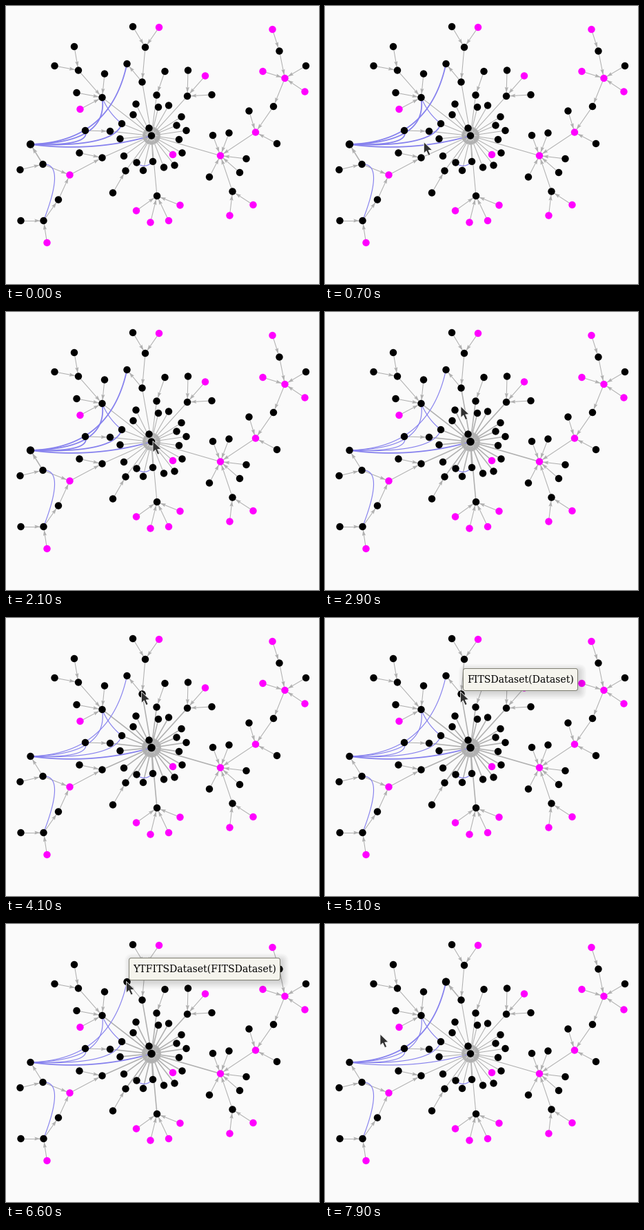
These frames come from a looping animation (454x404 px, 8 s). A matplotlib script:

```python
import numpy as np
import matplotlib.pyplot as plt
from matplotlib.animation import FuncAnimation
from matplotlib.collections import LineCollection, PolyCollection
from matplotlib.patches import Circle, FancyBboxPatch, Polygon

W, H, DPI = 454, 404, 64
PX = 72 / DPI
FRAMES, STEP = 80, 100
GREY, BLUE, MAGENTA = "#b0b0b0", "#8580ee", "#ff00ff"
RADIUS, HEAD = 5.2, 8.0

# Hubs of the class tree
CORE, LEFT, FITS, YTFITS = (211, 188.5), (35.5, 201), (197.5, 110.5), (175.5, 84)
TOP, WEST, NORTHWEST, EAST = (202, 60), (139.5, 133), (105, 93.5), (311, 217.5)
NORTHEAST, SOUTH, SOUTHEAST = (263, 131), (219, 276), (328.5, 269.5)
FAR, BEND, CORNER, CROWN = (362, 183.5), (388, 146), (404.5, 105), (396.5, 65.5)
SLOPE, FORK, MEET, STAIR, BASE = (139.5, 220.5), (53.5, 230), (92.5, 245.5), (76, 281.5), (54.5, 312)
TWIG, ARM, FOOT = (218.5, 129.5), (151, 182), (173.5, 239.5)
ELBOW, PAIR = (168, 171), ((189.5, 227.5), (213, 226))

edges = []   # (source, target)


def join(target, *sources):
    edges.extend((source, target) for source in sources)


join(CORE, FITS, WEST, NORTHEAST, TWIG, ARM, FOOT, SLOPE, SOUTH, EAST, ELBOW, *PAIR)
join(CORE, (236, 144.5), (221, 147), (188.5, 142.5), (184.5, 158), (254.5, 161),
     (247.5, 173.5), (261.5, 181), (251, 194), (255.5, 213.5), (242, 216),
     (244.5, 231.5), (229, 234.5), (199, 239), (171, 218), (165.5, 193), (207.5, 177.5))
join(FITS, TOP)
join(YTFITS, FITS)
join(TOP, (184, 30), (222, 31))
join(WEST, NORTHWEST, (143, 98.5), (102.5, 126), (107.5, 150))
join(NORTHWEST, (99, 59), (70.5, 87))
join(NORTHEAST, (264, 93.5), (289, 101.5), (298.5, 129))
join(TWIG, (230.5, 95))
join(ARM, (115, 181))
join(FOOT, (155, 271.5))
join(SLOPE, (106.5, 213.5), MEET)
join(MEET, FORK, STAIR)
join(LEFT, FORK)
join(FORK, (20.5, 238))
join(STAIR, BASE)
join(BASE, (21.5, 312), (59.5, 344))
join(SOUTH, (189, 297.5), (209.5, 314.5), (236, 312), (252.5, 289.5))
join(EAST, FAR, SOUTHEAST, (300, 188), (323.5, 184.5), (348.5, 222), (339, 242), (295, 248.5))
join(SOUTHEAST, (358.5, 289), (324.5, 304.5))
join(FAR, BEND, (352.5, 152.5), (393, 200))
join(BEND, CORNER)
join(CORNER, CROWN, (372.5, 95), (435, 87), (433.5, 124.5))
join(CROWN, (386.5, 34))

# Curved links: start, control, end
curves = [
    (LEFT, (151, 198), YTFITS),
    (LEFT, (149, 199), WEST),
    (LEFT, (124, 204), (115, 181)),
    (LEFT, (157, 206), ELBOW),
    (LEFT, (126, 213), CORE),
    (WEST, (149, 156), ELBOW),
    (FORK, (87, 228), BASE),
    (PAIR[0], (201, 238), PAIR[1]),
]

nodes = list(dict.fromkeys(p for edge in edges for p in edge))
pink = {MEET, EAST, FAR, CORNER, (222, 31), (107.5, 150), (289, 101.5), (242, 216),
        (59.5, 344), (189, 297.5), (209.5, 314.5), (236, 312), (252.5, 289.5),
        (358.5, 289), (324.5, 304.5), (372.5, 95), (433.5, 124.5), (386.5, 34)}


def bezier(start, control, end):
    t = np.linspace(0, 1, 40)[:, None]
    a, b, c = map(np.array, (start, control, end))
    return (1 - t) ** 2 * a + 2 * t * (1 - t) * b + t ** 2 * c


def arrow(source, target, scale):
    source, target = np.array(source), np.array(target)
    along = (target - source) / np.hypot(*(target - source))
    side = np.array([-along[1], along[0]])
    length = min(HEAD * scale, np.hypot(*(target - source)) - RADIUS)
    tip = target - along * RADIUS
    back = tip - along * length
    notch = tip - along * length * 0.85
    width = 2.6 * scale
    return [tip, back + side * width, notch, back - side * width]


fig = plt.figure(figsize=(W / DPI, H / DPI), dpi=DPI, facecolor="#fafafa")
ax = fig.add_axes([0, 0, 1, 1])
ax.set(xlim=(0, W), ylim=(H, 0))
ax.axis("off")

lines = LineCollection(edges, colors=GREY, zorder=1)
arcs = LineCollection([bezier(*c) for c in curves], colors=BLUE, zorder=2)
heads = PolyCollection([arrow(*e, 1) for e in edges], facecolors=GREY, edgecolors="none", zorder=3)
for collection in (lines, arcs, heads):
    ax.add_collection(collection, autolim=False)

dots = {}
for point in nodes:
    color = MAGENTA if point in pink else "black"
    dots[point] = ax.add_patch(Circle(point, RADIUS, fc=color, ec="none", zorder=4))


def rounded(x, y, w, h, r, **style):
    return ax.add_patch(FancyBboxPatch((x, y), w, h, boxstyle=f"round,pad=0,rounding_size={r}", **style))


def tooltip(x, y, w, h, label):
    parts = []
    for grow in np.linspace(9, -7, 12):
        parts.append(rounded(x + 3 - grow, y + 3 - grow, w + 2 * grow, h + 2 * grow,
                             max(grow + 3, 2), fc=(0, 0, 0, 0.018), ec="none", zorder=5))
    parts.append(rounded(x + 0.5, y + 0.5, w - 1, h - 1, 3, fc="#f5f4ed",
                         ec="#808074", lw=PX, zorder=6))
    parts.append(ax.text(x + 6, y + 21, label, family="DejaVu Serif", size=14 * PX,
                         color="black", va="baseline", zorder=7))
    return parts


tips = [
    (4300, 5300, tooltip(200, 73, 167, 33, "FITSDataset(Dataset)")),
    (6200, 7500, tooltip(178, 49, 220, 33, "YTFITSDataset(FITSDataset)")),
]

POINTER = np.array([(0, 0), (0, 16.5), (3.8, 13), (6.8, 19.6), (9.6, 18.4),
                    (6.7, 12), (12, 11.6)])
pointer = ax.add_patch(Polygon(POINTER, fc="#303030", ec="#f4f4f4", lw=0.8 * PX,
                               joinstyle="round", zorder=9))

# Pointer stops: time, x, y
path = np.array([
    (200, -12, 204), (500, 70, 205), (800, 180, 194), (1000, 213, 187.5),
    (2600, 213, 187.5), (2900, 197, 137), (3300, 196.5, 112), (3600, 196.5, 107),
    (5300, 196.5, 107), (5900, 174.5, 83.5), (7500, 174.5, 83.5), (7900, 80, 160),
])


def pointer_at(ms):
    i = np.clip(np.searchsorted(path[:, 0], ms) - 1, 0, len(path) - 2)
    (t0, *a), (t1, *b) = path[i], path[i + 1]
    u = np.clip((ms - t0) / (t1 - t0), 0, 1)
    return np.array(a) + (np.array(b) - a) * u


def selected_at(ms):
    return LEFT if ms < 2700 else CORE if ms < 7500 else YTFITS


def draw(frame):
    ms = frame * STEP
    chosen = selected_at(ms)
    lines.set_linewidths([(1.6 if chosen in e else 1.05) * PX for e in edges])
    arcs.set_linewidths([(1.75 if chosen in c else 1.15) * PX for c in curves])
    heads.set_verts([arrow(*e, 1.12 if chosen in e else 1) for e in edges])
    for point, dot in dots.items():
        dot.set_radius(RADIUS + 0.5 * (point == chosen))
    for start, end, parts in tips:
        for part in parts:
            part.set_visible(start <= ms < end)
    pointer.set_xy(POINTER + pointer_at(ms))
    return []


animation = FuncAnimation(fig, draw, frames=FRAMES, interval=STEP, repeat=True, repeat_delay=0)
plt.show()
```
